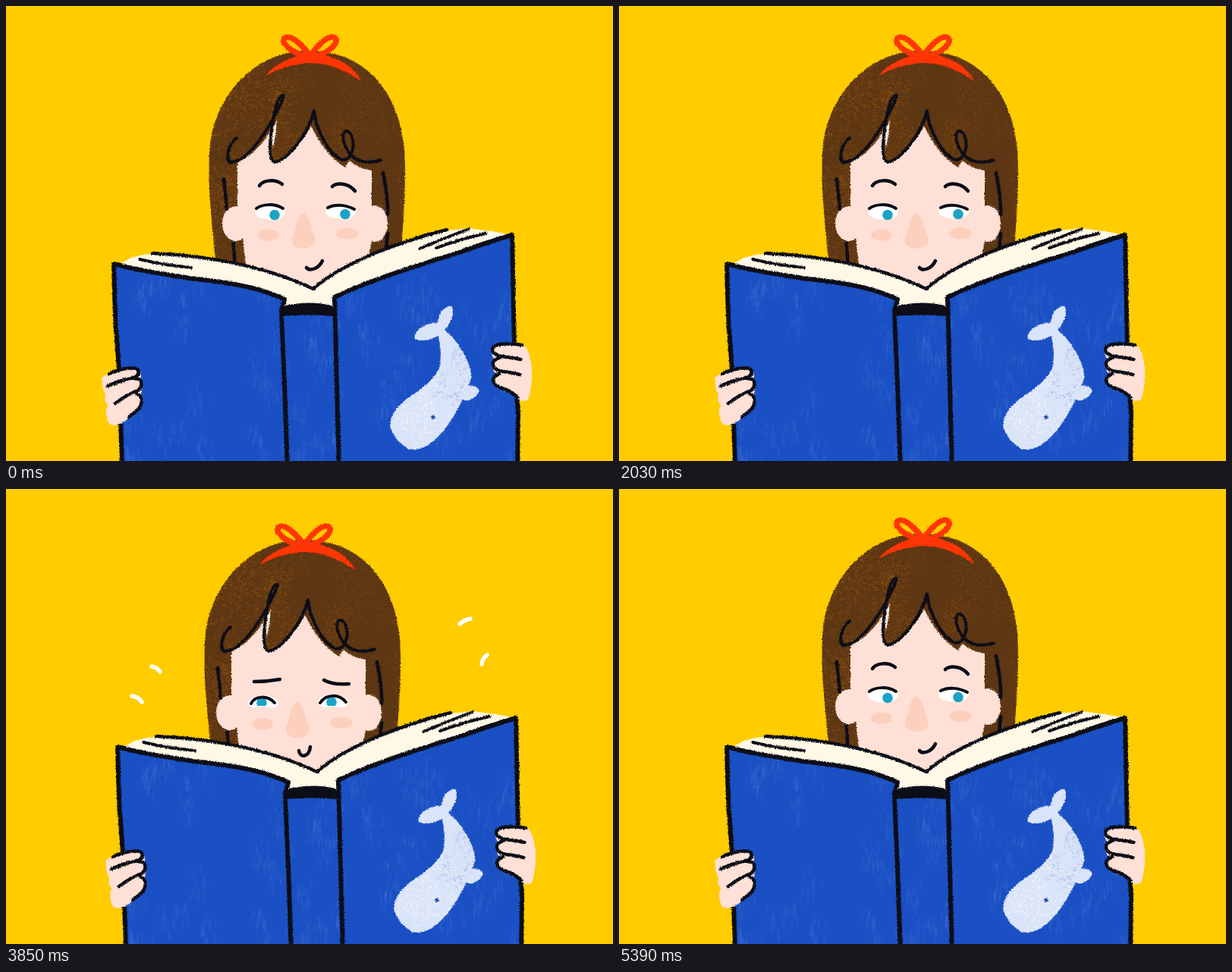
Write an HTML page with a canvas that moves like this. It is 800 by 600 pixels and loops after 5.46 s.

```html
<!DOCTYPE html>
<html lang="en">
<head>
<meta charset="utf-8">
<title>Reading girl</title>
<style>
html, body { margin: 0; width: 100%; height: 100%; overflow: hidden; background: #fc0; }
canvas { display: block; width: 800px; height: 600px; }
</style>
</head>
<body>
<canvas id="stage" width="800" height="600"></canvas>
<script>
const W = 800, H = 600, STEP = 70, LOOP = 5460;
const INK = '#0c0d17', SKIN = '#fee0d6', BLUSH = '#fdcfbd', HAIR = '#5d3613',
      BLUE = '#1a50c4', PAGE = '#fff8e6', RED = '#ff3506', TEAL = '#1ba3c6', WHALE = '#dae4f8';
const stage = document.getElementById('stage').getContext('2d');

function random(seed) {
  return () => {
    seed = (seed + 0x6d2b79f5) | 0;
    let t = Math.imul(seed ^ (seed >>> 15), 1 | seed);
    t = (t + Math.imul(t ^ (t >>> 7), 61 | t)) ^ t;
    return ((t ^ (t >>> 14)) >>> 0) / 4294967296;
  };
}

function fill(g, d, color) {
  g.fillStyle = color;
  g.fill(new Path2D(d));
}

function line(g, d, width, color = INK) {
  g.strokeStyle = color;
  g.lineWidth = width;
  g.lineCap = g.lineJoin = 'round';
  g.stroke(new Path2D(d));
}

function oval(g, x, y, rx, ry, color) {
  g.fillStyle = color;
  g.beginPath();
  g.ellipse(x, y, rx, ry, 0, 0, Math.PI * 2);
  g.fill();
}

// Grainy crayon edges: some pixels borrow a close neighbour.
function roughen(g, rnd) {
  const src = new Uint32Array(g.getImageData(0, 0, W, H).data.buffer);
  const out = g.createImageData(W, H);
  const dst = new Uint32Array(out.data.buffer);
  const nudge = r => r < 0.12 ? -1 : r > 0.88 ? 1 : 0;
  for (let y = 0; y < H; y++) {
    for (let x = 0; x < W; x++) {
      const r = rnd();
      const sx = Math.min(W - 1, Math.max(0, x + nudge(r)));
      const sy = Math.min(H - 1, Math.max(0, y + nudge((r * 97) % 1)));
      dst[y * W + x] = src[sy * W + sx];
    }
  }
  g.putImageData(out, 0, 0);
}

function layer(seed, draw) {
  const c = document.createElement('canvas');
  c.width = W;
  c.height = H;
  const g = c.getContext('2d');
  const rnd = random(seed);
  draw(g, rnd);
  roughen(g, rnd);
  return c;
}

// Clusters of small marks inside a shape.
function grain(g, rnd, shape, box, clusters, marks, spread, size, color) {
  const [x, y, w, h] = box;
  g.save();
  g.clip(new Path2D(shape));
  g.fillStyle = color;
  for (let i = 0; i < clusters; i++) {
    const cx = x + rnd() * w, cy = y + rnd() * h;
    for (let k = 0; k < marks; k++) {
      g.fillRect(cx + (rnd() + rnd() - 1) * spread[0], cy + (rnd() + rnd() - 1) * spread[1],
        size[0] * (0.5 + rnd()), size[1] * (0.5 + rnd()));
    }
  }
  g.restore();
}

const HAIR_SHAPE = 'M284 400C276 330 265 250 268 195C271 125 322 59 400 59C478 60 519 118 525 190C529 250 520 310 517 400Z';
const FACE = 'M305 207Q335 190 348 165L347 195Q350 208 362 203Q388 186 402 158Q420 196 447 213L452 204Q465 214 482 217L482 310L476 345L472 400L328 400L316 340L312 305L305 265Z';

function drawHair(g, rnd) {
  fill(g, HAIR_SHAPE, HAIR);
  grain(g, rnd, HAIR_SHAPE, [265, 65, 265, 280], 90, 50, [24, 30], [1.5, 1.5], 'rgba(142,84,18,.34)');
  grain(g, rnd, HAIR_SHAPE, [265, 90, 120, 240], 50, 60, [22, 30], [1.5, 1.5], 'rgba(158,94,18,.4)');
}

function drawHead(g, alt) {
  fill(g, FACE, SKIN);
  fill(g, 'M357 150Q349 168 351 188Q356 172 357 150Z', '#fff4ee');
  line(g, 'M287 228C288 240 290 252 291 268M299 306Q301 325 302 345', 4.5);
  line(g, 'M497 220C500 236 504 255 503 275M503 300Q502 315 500 328', 4.5);
  oval(g, 303, 287, 18, 23, SKIN);
  oval(g, 486, 287, 17, 24, SKIN);

  line(g, 'M304 174C293 182 288 204 296 206C318 205 345 168 366 120C366 113 357 122 355 136C349 165 343 203 354 206C370 204 398 170 406 138C408 164 428 201 446 203C461 199 461 167 449 165C439 167 446 186 455 197C465 207 480 208 494 203', 4);

  g.save();
  g.translate(alt ? -3 : 0, alt ? 1 : 0);
  fill(g, 'M342 92C354 77 374 66 402 62C434 65 458 78 468 99C448 85 426 75 402 75C380 76 360 82 342 92Z', RED);
  line(g, 'M400 67C382 65 361 50 367 43C374 36 388 49 400 65M402 67C422 64 440 50 434 42C427 37 411 50 402 65', 7.5, RED);
  g.restore();

  oval(g, 346, 302, 14, 7.5, BLUSH);
  oval(g, 450, 300, 15, 7.5, BLUSH);
  fill(g, 'M392 273C382 277 383 296 377 306C375 316 383 319 392 320C401 319 409 315 408 306C402 296 402 277 392 273Z', BLUSH);
}

const LEFT = 'M142 340C180 350 210 354 250 360C300 365 342 374 367 387L363 402L367 500L371 610L153 610L149 480L144 410Z';
const SPINE = 'M362 402L432 402L437 610L371 610Z';
const RIGHT = 'M433 384C480 361 550 340 600 324C630 313 650 307 667 302L670 450L675 540L674 610L439 610L436 500Z';
const BODY = 'M568 429L577 426C593 439 609 462 613 484C614 490 612 496 609 500Q622 501 624 507C619 518 608 523 602 519C595 532 586 549 576 561C560 580 544 588 530 584Q514 575 507 557C505 540 517 526 531 516C550 504 566 491 571 477C575 461 572 443 568 429Z';
const FLUKE = 'M572 434Q554 444 539 440Q536 430 552 421Q564 416 569 418Q570 399 587 395Q593 407 582 422Z';

function drawWhale(g, rnd) {
  fill(g, BODY, WHALE);
  fill(g, FLUKE, WHALE);
  grain(g, rnd, BODY, [515, 480, 90, 100], 26, 22, [18, 22], [2, 2], 'rgba(255,255,255,.3)');
  grain(g, rnd, BODY, [570, 440, 40, 85], 18, 18, [12, 16], [1.5, 1.5], 'rgba(90,130,215,.22)');
  oval(g, 563, 542, 2.6, 2.4, '#1d4aa8');
}

function drawHands(g) {
  fill(g, 'M127 489Q150 476 172 477Q181 484 177 493Q182 503 177 514Q182 528 162 543Q148 557 136 551Q129 540 134 526Q129 522 131 513Q126 503 127 489Z', SKIN);
  line(g, 'M136 485C150 479 166 475 173 479C179 486 170 490 160 492Q145 496 134 501M168 491C182 490 180 502 174 507Q158 513 144 524M172 511C183 516 179 528 172 534L162 542', 4.5);
  fill(g, 'M644 448Q662 442 685 449Q694 465 693 490Q692 508 688 520Q677 523 672 515Q652 506 645 500Q638 491 647 486Q636 476 644 467Q636 455 644 448Z', SKIN);
  line(g, 'M680 447C664 445 643 443 641 453C641 463 660 462 678 466M650 464C637 468 640 480 655 482Q666 483 677 486M650 485C638 489 641 499 651 503Q666 508 674 516', 4.5);
}

function drawBook(g, rnd) {
  fill(g, 'M148 341L165 332Q190 324 220 328C300 336 360 350 405 373C440 340 520 308 580 296L610 293L640 297L668 302C600 328 500 355 433 386L431 402L362 402L367 388C330 368 240 358 148 341Z', PAGE);
  line(g, 'M193 326C265 329 342 343 405 373C440 341 516 311 581 295', 4.5);
  line(g, 'M176 334Q210 342 244 345M545 320Q578 306 610 294M567 319Q600 307 632 300', 4);

  for (const d of [LEFT, SPINE, RIGHT]) fill(g, d, BLUE);
  for (const d of [LEFT, SPINE, RIGHT]) {
    grain(g, rnd, d, [140, 350, 540, 250], 65, 14, [16, 26], [2.5, 12], 'rgba(95,135,225,.1)');
  }
  drawWhale(g, rnd);

  line(g, LEFT, 6);
  line(g, RIGHT, 6);
  fill(g, 'M361 409L368 395Q400 388 430 395L433 409Q398 406 361 409Z', INK);
  drawHands(g);
}

function drawEye(g, white, x, y, lid, clipY) {
  oval(g, white[0], white[1], 20, 9.5, '#fff');
  g.save();
  g.beginPath();
  g.rect(x - 15, y - 15, 30, clipY - y + 15);
  g.clip();
  oval(g, x, y, 6.8, 6.8, TEAL);
  g.restore();
  line(g, lid, 4);
}

function drawCalm(g, look) {
  line(g, 'M334 237C339 229 355 228 364 235M430 238C437 232 452 234 460 244', 4.5);
  drawEye(g, [348, 272], 348 + look, 275.5, 'M330 267C338 261 354 260 365 267', 290);
  drawEye(g, [441, 271], 441 + look, 274.5, 'M424 266C434 261 448 262 459 268', 290);
  line(g, 'M396 345C400 350 412 347 417 336', 4.5);
}

function drawWorried(g) {
  line(g, 'M335 246Q352 246 369 243M427 244C434 248 446 250 460 249', 4.5);
  drawEye(g, [347, 274], 345, 274, 'M331 275C336 264 353 264 362 274', 278);
  drawEye(g, [439, 273], 437, 273, 'M422 274C430 262 447 262 456 273', 278);
  g.save();
  g.beginPath();
  g.rect(325, 279, 137, 8);
  g.clip();
  oval(g, 347, 285, 22, 6, SKIN);
  oval(g, 439, 285, 22, 6, SKIN);
  g.restore();
  line(g, 'M394 337C395 347 408 346 409 332', 4.5);
}

function ramp(t, a, b) {
  const u = Math.min(1, Math.max(0, (t - a) / (b - a)));
  return u * u * (3 - 2 * u);
}

// Pupil offset: right, left, right, centre, right.
function gaze(t) {
  return 6 - 12 * ramp(t, 560, 980) + 12 * ramp(t, 1540, 1960)
    - 6 * ramp(t, 2520, 2800) + 6 * ramp(t, 5000, 5320);
}

const hairs = [0, 1].map(i => layer(51 + i, drawHair));
const heads = [0, 1].map(i => layer(11 + i, g => drawHead(g, i === 1)));
const books = [0, 1].map(i => layer(31 + i, drawBook));

function render(time) {
  const n = Math.floor((time % LOOP) / STEP);
  const t = n * STEP;
  const phase = n % 7;
  const boil = phase > 1 && phase < 6 ? 1 : 0;
  const duck = ramp(t, 2940, 3400) - ramp(t, 4660, 5100);
  const shift = ramp(t, 2940, 3360) - ramp(t, 4560, 5040);
  const g = stage;

  g.fillStyle = '#fc0';
  g.fillRect(0, 0, W, H);

  g.drawImage(hairs[boil], boil * 1.5 - 6 * duck, 8 * duck);
  g.save();
  g.translate(-8 * duck, 8 * duck);
  g.drawImage(heads[boil], 0, 0);
  if (t >= 3150 && t < 4690) drawWorried(g);
  else drawCalm(g, gaze(t));
  g.restore();

  g.drawImage(books[boil], 5 * shift, 0);

  if (t >= 3290 && t < 4550) {
    line(g, 'M192 234Q199 235 203 241M166 273Q175 274 179 281M598 178Q603 173 612 171M627 231Q628 223 634 219', 5.5, '#fff');
  }
}

const start = performance.now();
function tick() {
  render(performance.now() - start);
  requestAnimationFrame(tick);
}
tick();
</script>
</body>
</html>
```
